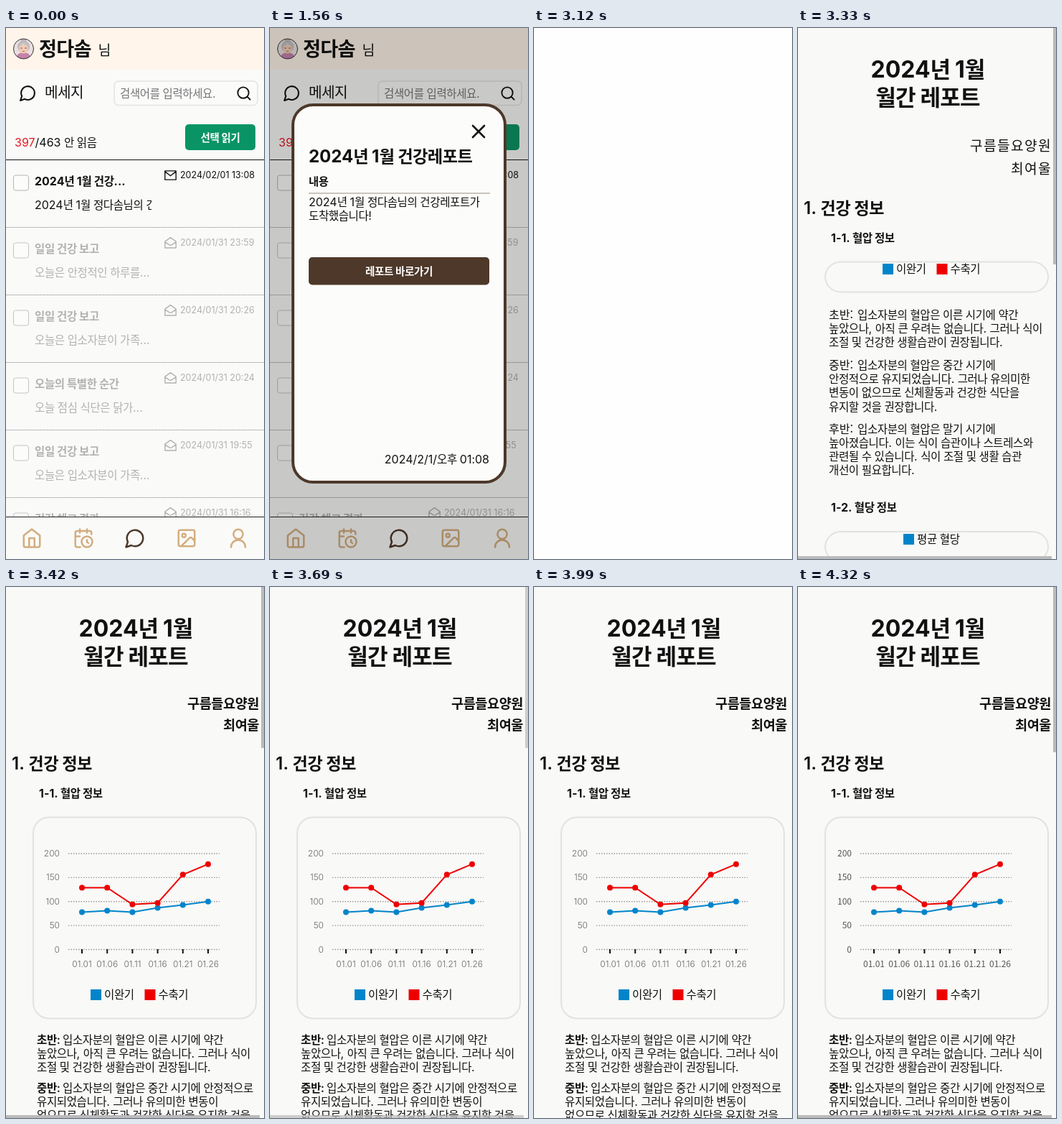
An HTML page that plays this animation: 360 by 739 pixels, repeating every 4.35 s.

```html
<!DOCTYPE html>
<html lang="ko">
<head>
<meta charset="utf-8">
<style>
  html, body { margin: 0; width: 100%; height: 100%; overflow: hidden; background: #fefefe; }
  svg { display: block; width: 100%; height: 100%; font-family: Inter, "Noto Sans CJK KR", "Noto Sans CJK", sans-serif; }
  text { white-space: pre; }
  .ko { font-size: .97em; letter-spacing: -.025em; }
  .fallback { font-family: "Noto Sans CJK KR", "Noto Sans CJK", sans-serif; }
  .wide { letter-spacing: .07em; }
</style>
</head>
<body>
<svg id="stage" viewBox="0 0 360 739"></svg>
<script>
const LOOP = 4350;
const RESIDENT = '정다솜', PATIENT = '최여울', HOME = '구름들요양원';
const INK = '#111', BROWN = '#4d3829', TAN = '#d3ad7f', PAGE = '#fafaf8';
const BLUE = '#0284cb', RED = '#ee0000';

// Hangul is set slightly tighter than the Latin text around it.
const tighten = s => s.replace(/[가-힣][가-힣 ]*/g, run => `<tspan class="ko">${run}</tspan>`);

const text = (x, y, size, str, { weight = 400, fill = INK, anchor = 'start', cls = '' } = {}) =>
  `<text x="${x}" y="${y}" font-size="${size}" font-weight="${weight}" fill="${fill}" text-anchor="${anchor}" class="${cls}">${cls ? str : tighten(str)}</text>`;
const bold = (x, y, size, str, options = {}) => text(x, y, size, str, { weight: 700, ...options });

const rect = (x, y, w, h, fill, r = 0, stroke = 'none', width = 1) =>
  `<rect x="${x}" y="${y}" width="${w}" height="${h}" rx="${r}" fill="${fill}" stroke="${stroke}" stroke-width="${width}"/>`;
const circle = (x, y, r, fill) => `<circle cx="${x}" cy="${y}" r="${r}" fill="${fill}"/>`;
const line = (x1, y1, x2, y2, stroke, width = 1, dash = 'none') =>
  `<path d="M${x1} ${y1}L${x2} ${y2}" stroke="${stroke}" stroke-width="${width}" stroke-dasharray="${dash}"/>`;

const ring = (x, y, r) => `M${x - r} ${y}a${r} ${r} 0 1 0 ${2 * r} 0a${r} ${r} 0 1 0 ${-2 * r} 0`;

// Icon outlines on a 24-unit grid.
const ICONS = {
  home: 'M3 9l9-7 9 7v11a2 2 0 0 1-2 2H5a2 2 0 0 1-2-2zM9 22V12h6v10',
  schedule: 'M21 7.5V6a2 2 0 0 0-2-2H5a2 2 0 0 0-2 2v14a2 2 0 0 0 2 2h3.5M16 2v4M8 2v4M3 10h5M17.5 17.5L16 16.3V14' + ring(16, 16, 6),
  chat: 'M7.9 20A9 9 0 1 0 4 16.1L2 22Z',
  gallery: 'M5 3h14a2 2 0 0 1 2 2v14a2 2 0 0 1-2 2H5a2 2 0 0 1-2-2V5a2 2 0 0 1 2-2zM21 15l-3.1-3.1a2 2 0 0 0-2.8 0L6 21' + ring(9, 9, 2),
  user: 'M20 22a8 8 0 0 0-16 0' + ring(12, 7.5, 5.3),
  search: ring(11, 11, 8) + 'M21 21l-4.3-4.3',
  mail: 'M2 4h20v16H2zM2 5l10 8 10-8',
  mailOpen: 'M2 9.5l10-7 10 7V21H2zM2 10.5l8 5.2q2 1 4 0l8-5.2',
  close: 'M4 4l16 16M20 4L4 20'
};
const icon = (name, cx, cy, size, stroke, width = 2) =>
  `<path transform="translate(${cx - size / 2} ${cy - size / 2}) scale(${size / 24})" d="${ICONS[name]}" fill="none" stroke="${stroke}" stroke-width="${width}" stroke-linecap="round" stroke-linejoin="round"/>`;

const MESSAGES = [
  ['2024년 1월 건강...', `2024년 1월 ${RESIDENT}님의 건강`, '2024/02/01 13:08'],
  ['일일 건강 보고', '오늘은 안정적인 하루를...', '2024/01/31 23:59'],
  ['일일 건강 보고', '오늘은 입소자분이 가족...', '2024/01/31 20:26'],
  ['오늘의 특별한 순간', '오늘 점심 식단은 닭가...', '2024/01/31 20:24'],
  ['일일 건강 보고', '오늘은 입소자분이 가족...', '2024/01/31 19:55'],
  ['건강 체크 결과', '', '2024/01/31 16:16']
];

function messageRow([title, body, date], i) {
  const y = 183 + 94 * i, fill = i ? '#b2b2b2' : INK;
  return line(0, y + .5, 360, y + .5, i ? '#aaa' : INK, 1, i ? '2 .6' : 'none')
    + rect(10.5, y + 22, 21, 21, '#fcfcfb', 3, i ? '#c4c4c4' : '#b4b4b4')
    + bold(40, y + 36, 16, title, { fill })
    + `<g clip-path="url(#preview)">${text(40, y + 69, 16, body, { fill })}</g>`
    + icon(i ? 'mailOpen' : 'mail', 229.5, y + 22, 18.5, fill, 1.8)
    + text(243, y + 26.3, 12.5, date, { fill });
}

const avatar = `<g clip-path="url(#face)">${circle(24.5, 29, 14, '#eadfe0')}
  ${circle(24.5, 18.5, 4, '#b7b3b5')}${circle(24.5, 26, 8.5, '#bdb9bb')}
  <ellipse cx="24.5" cy="41" rx="10" ry="7" fill="#c582a8"/>
  <ellipse cx="24.5" cy="28.5" rx="6.3" ry="7" fill="#f4cbb5"/>
  <path d="M18 26q1-6 6.5-6t6.5 6q-4-1-6.5-4-2.500 3-6.500 4" fill="#c8c5c6"/>
  <path d="M20 28h3m3 0h3m-6 4q1.500 1.500 3 0" stroke="#805f58" fill="none"/></g>
  <circle cx="24.5" cy="29" r="14" fill="none" stroke="#333"/>`;

const navigation = rect(0, 680, 360, 59, PAGE) + line(0, 680.5, 360, 680.5, '#222')
  + ['home', 'schedule', 'chat', 'gallery', 'user']
    .map((name, i) => icon(name, 36 + 72 * i, 710, 30, name === 'chat' ? BROWN : TAN)).join('');

const inbox = rect(0, 0, 360, 739, PAGE) + rect(0, 0, 360, 58, '#fff5ea') + avatar
  + bold(46, 38.5, 28, RESIDENT) + text(128.500, 38, 20, '님')
  + icon('chat', 30.5, 90.5, 25, INK) + text(54, 97, 20.8, '메세지')
  + rect(151, 74, 200, 33.5, '#fbfbfa', 6, '#e4e4e2', 1.6)
  + text(159, 97, 16, '검색어를 입력하세요.', { fill: '#757575' })
  + icon('search', 332, 91, 23, INK)
  + text(12, 165, 16, '<tspan fill="#e01e24">397</tspan>/463 안 읽음')
  + rect(250, 134, 98, 36, '#0a9466', 5)
  + bold(299, 157.5, 15, '선택 읽기', { fill: '#fff', anchor: 'middle' })
  + MESSAGES.map(messageRow).join('') + navigation;

const dialog = rect(0, 0, 360, 739, 'rgba(0,0,0,.2)')
  + rect(32, 107, 296, 525, '#fcfcfa', 28, BROWN, 4)
  + icon('close', 291, 144, 24, INK, 2.6)
  + bold(54, 186.5, 24, '2024년 1월 건강레포트')
  + bold(54, 219, 15.8, '내용')
  + line(54, 230, 307, 230, '#b9b2a8', 1.5)
  + text(54, 248, 16, `2024년 1월 ${RESIDENT}님의 건강레포트가`)
  + text(54, 267, 16, '도착했습니다!')
  + rect(54, 319, 252, 38.5, BROWN, 5)
  + bold(180, 344, 15, '레포트 바로가기', { fill: '#fff', anchor: 'middle' })
  + text(306, 606, 16, '2024/2/1/오후 01:08', { anchor: 'end' });

const card = (y, h) => rect(38, y + 1, 311, h - 2, 'none', 22, '#e2e2df', 2);
const legend = (x, y, fill, label) => rect(x, y, 15, 15, fill) + text(x + 19, y + 13, 16, label);
const pressureLegend = y => legend(118, y, BLUE, '이완기') + legend(193.5, y, RED, '수축기');

function paragraph(y, label, lines, fallback) {
  const heading = fallback
    ? text(43, y, 16, label, { weight: 500, cls: 'fallback' })
    : text(43, y, 16, label, { weight: 600 });
  return heading + lines.map((s, i) => text(i ? 43 : fallback ? 83 : 79, y + 19.2 * i, 16, s)).join('');
}

const EARLY = ['입소자분의 혈압은 이른 시기에 약간', '높았으나, 아직 큰 우려는 없습니다. 그러나 식이', '조절 및 건강한 생활습관이 권장됩니다.'];

const reportTitle = rect(0, 0, 360, 739, '#f9f9f7')
  + bold(181, 69, 32, '2024년 1월', { anchor: 'middle' })
  + bold(181, 107.5, 32, '월간 레포트', { anchor: 'middle' });
const sectionTitles = y => bold(8, y, 24, '1. 건강 정보', { weight: 600 }) + bold(46, y + 39, 16, '1-1. 혈압 정보');

const signature = { anchor: 'end', weight: 500, cls: 'fallback wide' };
const loadingReport = reportTitle
  + text(354, 170.5, 19.2, HOME, signature) + text(354, 202.5, 19.2, PATIENT, signature)
  + sectionTitles(259) + card(324.5, 44) + pressureLegend(328)
  + paragraph(405, '초반:', EARLY, true)
  + paragraph(475, '중반:', ['입소자분의 혈압은 중간 시기에', '안정적으로 유지되었습니다. 그러나 유의미한', '변동이 없으므로 신체활동과 건강한 식단을', '유지할 것을 권장합니다.'], true)
  + paragraph(563.500, '후반:', ['입소자분의 혈압은 말기 시기에', '높아졌습니다. 이는 식이 습관이나 스트레스와', '관련될 수 있습니다. 식이 조절 및 생활 습관', '개선이 필요합니다.'], true)
  + bold(46, 673, 16, '1-2. 혈당 정보') + card(700, 44) + legend(147, 704, BLUE, '평균 혈당');

const dayX = i => 106 + 35.2 * i;
const valueY = v => 504.5 - v * .6675;
const series = (values, color) =>
  `<polyline points="${values.map((v, i) => [dayX(i), valueY(v)])}" fill="none" stroke="${color}" stroke-width="2"/>`
  + values.map((v, i) => circle(dayX(i), valueY(v), 4, color)).join('');

const TICKS = [0, 50, 100, 150, 200];
const DAYS = ['01.01', '01.06', '01.11', '01.16', '01.21', '01.26'];
const axisLabels = style =>
  TICKS.map(v => text(75, valueY(v) + 4, 12, v + '', { ...style, anchor: 'end' })).join('')
  + DAYS.map((d, i) => text(dayX(i), 528.5, 12, d, { ...style, anchor: 'middle' })).join('');

const owner = { anchor: 'end', weight: 600 };
const report = reportTitle
  + text(353, 169, 19.2, HOME, owner) + text(353, 199, 19.2, PATIENT, owner)
  + sectionTitles(254) + card(319.5, 282)
  + TICKS.map(v => line(87, valueY(v), 298, valueY(v), '#999', 1.3, '1.5 2')).join('')
  + DAYS.map((d, i) => line(dayX(i), 504, dayX(i), 510, INK, 2)).join('')
  + series([78, 81, 78, 87, 93, 100], BLUE)
  + series([129, 129, 94, 97, 156, 178], RED)
  + pressureLegend(560)
  + paragraph(636, '초반:', EARLY)
  + paragraph(703, '중반:', ['입소자분의 혈압은 중간 시기에 안정적으로', '유지되었습니다. 그러나 유의미한 변동이', '없으므로 신체활동과 건강한 식단을 유지할 것을']);

const layers = {
  inbox, dialog, loadingReport, report,
  plainLabels: axisLabels({ weight: 300, fill: '#555', cls: 'fallback' }),
  webLabels: axisLabels({ weight: 300, fill: '#666' }),
  bars: `<rect id="thumb" x="356" width="4" fill="#bbb"/>` + rect(0, 735, 354, 4, '#bbb')
};

document.getElementById('stage').innerHTML =
  `<defs><clipPath id="face">${circle(24.5, 29, 14)}</clipPath>
   <clipPath id="preview">${rect(40, 183, 163, 497)}</clipPath></defs>`
  + Object.entries(layers).map(([id, content]) => `<g id="${id}">${content}</g>`).join('');

const element = id => document.getElementById(id);
const show = (id, visible) => element(id).setAttribute('display', visible ? 'inline' : 'none');

const FADE = [[0, 1], [3630, .9], [3660, .8], [3690, .7], [3750, .5], [3810, .3], [3870, 0], [4020, 1]];
const barOpacity = t => FADE.filter(([start]) => t >= start).pop()[1];
const thumbHeight = t => t < 3360 ? 329 : t < 3390 || t >= 4320 ? 230 : 224;

function draw(now) {
  const t = now % LOOP;
  const webFont = t >= 3390 && t < 4290;
  show('inbox', t < 3120);
  show('dialog', t >= 1560 && t < 3120);
  show('loadingReport', t >= 3330 && t < 3360);
  show('report', t >= 3360);
  show('plainLabels', t >= 3360 && !webFont);
  show('webLabels', webFont);
  show('bars', t >= 3330);
  element('bars').setAttribute('opacity', barOpacity(t));
  element('thumb').setAttribute('height', thumbHeight(t));
}

const start = performance.now();
function tick() {
  draw(performance.now() - start);
  requestAnimationFrame(tick);
}
tick();
</script>
</body>
</html>
```
